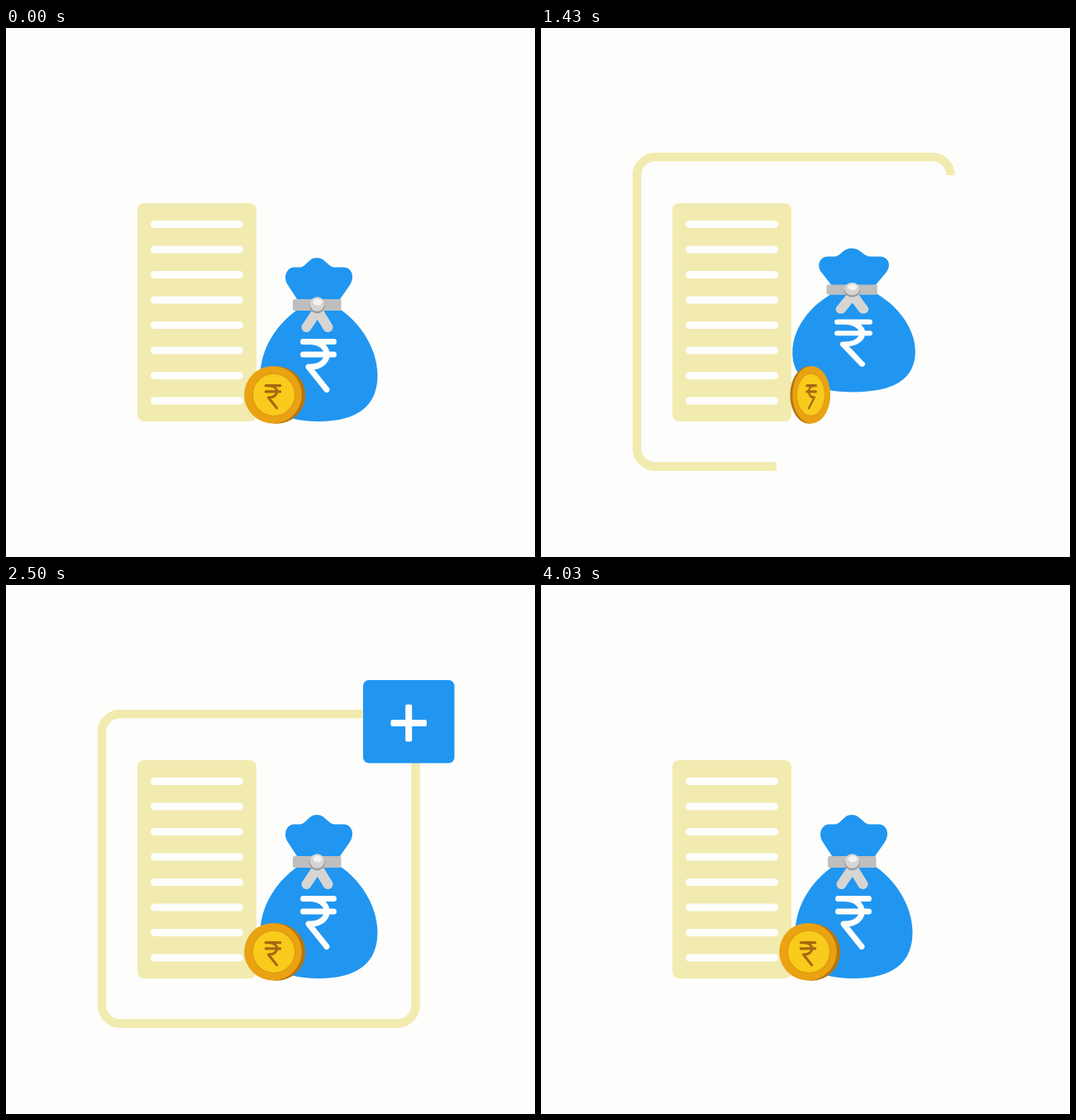
Animation of 640x640 px, one loop 4260 ms. Source, as an HTML page:

```html
<!DOCTYPE html>
<html lang="en">
<head>
<meta charset="utf-8">
<title>Savings</title>
<style>
  html, body { margin: 0; width: 100%; height: 100%; overflow: hidden; background: #fdfdfc; }
  svg { display: block; width: 100%; height: 100%; }
</style>
</head>
<body>
<svg viewBox="0 0 640 640">
  <defs>
    <path id="rupee" d="M-18.5 -29.5H18.5M-18.5 -14H18.5M-11 -29.5C17 -29.5 17 1 -10 1H-12L10 28.5"
      fill="none" stroke-linecap="round" stroke-linejoin="round"/>
  </defs>

  <path id="outline" fill="none" stroke="#f2ebb0" stroke-width="10.5"
    d="M495.5 178A22 22 0 0 0 473.5 156H138A22 22 0 0 0 116 178V508.5A22 22 0 0 0 138 530.5H473.5A22 22 0 0 0 495.5 508.5V178"/>

  <rect x="159" y="212" width="144" height="264" rx="8" fill="#f2ebb0"/>
  <path id="rows" stroke="#fdfdfc" stroke-width="9" stroke-linecap="round"/>

  <g id="bag">
    <path fill="#2096f1" d="M354 331L341 311C335 302 339 290 348 289.5H354C364 290 365 278 376 278
      C387 278 389 290 399 289.5H409C419 290 422 302 416 311L402 331V339
      C428 355 449.5 388 449.5 420C449.5 456 427 476 378 476C330 476 307.5 457 307.5 422C307.5 388 328 357 354 340Z"/>
    <rect x="347" y="328" width="58.5" height="14" rx="2" fill="#bebebe"/>
    <path d="M375 345L363.5 362M379 345L389.5 362" stroke="#d6d5d3" stroke-width="12" stroke-linecap="round"/>
    <circle cx="376.5" cy="336" r="9.3" fill="#9c9c9a"/>
    <circle cx="376.5" cy="334" r="8.7" fill="#d6d5d3"/>
    <ellipse cx="377" cy="331.5" rx="5.5" ry="4" fill="#f3f3f1"/>
    <use href="#rupee" x="378" y="409" stroke="#fdfdfc" stroke-width="7"/>
  </g>

  <g id="coin">
    <circle cx="327.5" cy="444" r="34.7" fill="#b6760f"/>
    <circle cx="323" cy="443.7" r="34.8" fill="#eaa212"/>
    <circle cx="324" cy="443.7" r="25.6" fill="#f8cb1c" stroke="#dc9a12" stroke-width="1.2"/>
    <use href="#rupee" transform="translate(323 446.5) scale(.47)" stroke="#a5680f" stroke-width="6.6"/>
  </g>

  <g id="badge">
    <rect x="432" y="115" width="110.5" height="100.5" rx="7" fill="#2096f1"/>
    <g fill="#fdfdfc">
      <rect x="465.5" y="163" width="43.5" height="8" rx="2"/>
      <rect x="483.2" y="144.5" width="8" height="45" rx="2"/>
    </g>
  </g>
</svg>

<script>
const LOOP = 4260;
const byId = id => document.getElementById(id);
const [outline, rows, bag, coin, badge] = ['outline', 'rows', 'bag', 'coin', 'badge'].map(byId);

rows.setAttribute('d', Array.from({ length: 8 }, (_, i) => `M179.5 ${237.5 + 30.5 * i}H282.5`).join(''));

const linear = p => p;
const smooth = p => (1 - Math.cos(Math.PI * p)) / 2;

// keys: [time, value] pairs in order of time
function track(t, keys, ease = smooth) {
  const next = keys.findIndex(([time]) => time > t);
  if (next < 0) return keys[keys.length - 1][1];
  if (next === 0) return keys[0][1];
  const [t0, v0] = keys[next - 1], [t1, v1] = keys[next];
  return v0 + (v1 - v0) * ease((t - t0) / (t1 - t0));
}

const scaleAbout = (x, y, sx, sy) => `translate(${x} ${y}) scale(${sx} ${sy}) translate(${-x} ${-y})`;

const pathLength = outline.getTotalLength();

function drawOutline(t) {
  const drawn = track(t, [[20, 0], [2285, 1], [3450, 1], [4020, 0]], linear) * pathLength;
  outline.setAttribute('visibility', drawn > 0 ? 'visible' : 'hidden');
  outline.setAttribute('stroke-dasharray', `${drawn} ${pathLength + 10}`);
}

function drawBag(t) {
  const squash = track(t, [[100, 0], [820, 1], [1430, 0.85], [1860, 1], [2400, 0]]);
  const lift = track(t, [[890, 0], [1430, 35.5], [1980, 0]]);
  bag.setAttribute('transform',
    `translate(0 ${-lift}) ` + scaleAbout(378, 475.5, 1 + 0.055 * squash, 1 - 0.143 * squash));
}

function drawCoin(t) {
  const turn = track(t, [[1000, 1], [1520, -1], [2000, 1]], linear);
  coin.setAttribute('transform', scaleAbout(325.5, 444, turn, 1));
}

function drawBadge(t) {
  const size = track(t, [[2200, 0], [2380, 1.2], [2460, 1], [3770, 1], [3850, 1.2], [4020, 0]]);
  badge.setAttribute('transform', scaleAbout(487.2, 165.2, size, size));
}

const start = performance.now();

function render() {
  const t = (performance.now() - start) % LOOP;
  drawOutline(t);
  drawBag(t);
  drawCoin(t);
  drawBadge(t);
  requestAnimationFrame(render);
}
render();
</script>
</body>
</html>
```
